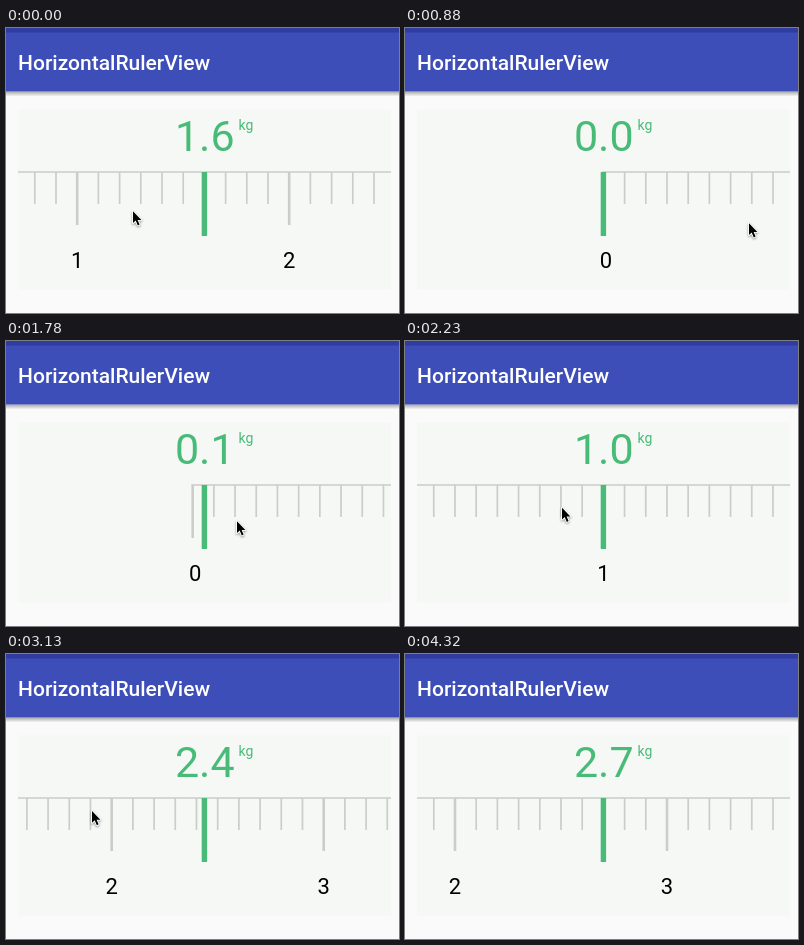
An HTML page for the animation above (4.47 s loop, 393x285 px).

```html
<!DOCTYPE html>
<html lang="en">
<head>
<meta charset="utf-8">
<title>HorizontalRulerView</title>
<style>
  html, body { margin: 0; width: 100%; height: 100%; overflow: hidden; background: #fafafa; }
  svg { display: block; width: 393px; height: 285px; font-family: Roboto, sans-serif; }
  #cursor { filter: drop-shadow(0 1px 1px rgba(0, 0, 0, .4)); }
</style>
</head>
<body>
<svg viewBox="0 0 393 285">
  <defs>
    <linearGradient id="shade" x2="0" y2="1">
      <stop offset="0" stop-color="#000" stop-opacity=".32"/>
      <stop offset="1" stop-color="#000" stop-opacity="0"/>
    </linearGradient>
    <clipPath id="panel"><rect x="12" y="82" width="373" height="180"/></clipPath>
  </defs>
  <rect width="393" height="285" fill="#fafafa"/>
  <rect y="63.5" width="393" height="5" fill="url(#shade)"/>
  <rect width="393" height="63.5" fill="#3d4eb8"/>
  <rect width="393" height="4.5" fill="#303c9f"/>
  <text x="12" y="42.4" font-size="21" font-weight="500" fill="#fff">HorizontalRulerView</text>
  <rect x="12" y="81.5" width="373" height="180" fill="#f6f8f5"/>
  <g clip-path="url(#panel)">
    <g fill="none" stroke="#cacdc9">
      <path id="base" stroke-width="1.7"/>
      <path id="minor" stroke-width="1.7"/>
      <path id="major" stroke-width="2.6"/>
    </g>
    <g id="labels" font-size="22" text-anchor="middle" fill="#000"></g>
  </g>
  <path d="M198.4 144V208" stroke="#48bb78" stroke-width="5.4"/>
  <g fill="#48bb78">
    <text id="value" x="198.8" y="123.2" font-size="43" text-anchor="middle"></text>
    <text x="232.6" y="101.8" font-size="14">kg</text>
  </g>
  <path id="cursor" d="M.5 .8V12.6L3.2 10.1L5.3 14.9L7.1 14.1L5.1 9.4H8.9Z"
        fill="#000" stroke="#fff" stroke-width="1.8" stroke-linejoin="round" paint-order="stroke"/>
</svg>
<script>
const LOOP = 4470, STEP = 149, STEPS = 30;
const CENTER = 198.4, UNIT = 212, TOP = 144;

const smooth = p => p * p * (3 - 2 * p);
const fling = p => 1 - (1 - p) ** 2.7;

// Each move eases to a new place between two steps.
const move = (from, to, place, ease = smooth) => ({ from, to, place, ease });

const scroll = {
  home: [1.6],
  moves: [move(0, 5, [0], fling), move(11.5, 15, [1]), move(14.95, 23, [2.7])]
};
const pointer = {
  home: [126.5, 182.5],
  moves: [
    move(0, 2, [348.5, 183.5]),
    move(2, 6, [343.5, 194.5]),
    move(8, 12, [230.5, 179.5]),
    move(12, 18, [82.5, 152.5]),
    move(18, 24, [88.5, 160]),
    move(24, 29, [350, 300])
  ]
};

function placeAt({ home, moves }, step) {
  return moves.reduce((at, { from, to, place, ease }) => {
    const p = ease(Math.min(1, Math.max(0, (step - from) / (to - from))));
    return at.map((v, i) => v + (place[i] - v) * p);
  }, home);
}

const $ = id => document.getElementById(id);
const labels = Array.from({ length: 5 }, (_, n) => {
  const el = document.createElementNS("http://www.w3.org/2000/svg", "text");
  el.textContent = n;
  el.setAttribute("y", 240);
  return $("labels").appendChild(el);
});

function draw(ms) {
  const step = Math.min(STEPS - 1, Math.floor((ms % LOOP + 14) / STEP));
  const [kg] = placeAt(scroll, step);
  const [x, y] = placeAt(pointer, step);
  const xOf = v => CENTER + (v - kg) * UNIT;

  let minor = "", major = "";
  for (let i = 0; i <= 40; i++) {
    const at = `M${xOf(i / 10).toFixed(2)} ${TOP}V`;
    if (i % 10) minor += at + 176;
    else major += at + 197;
  }
  $("minor").setAttribute("d", minor);
  $("major").setAttribute("d", major);
  $("base").setAttribute("d", `M${Math.max(12, xOf(0) - 1.3)} ${TOP}H385`);
  labels.forEach((el, n) => el.setAttribute("x", xOf(n) + (n ? 0 : 2.5)));
  $("value").textContent = kg.toFixed(1);
  $("cursor").setAttribute("transform", `translate(${x} ${y})`);
}

const start = performance.now();
function tick() {
  draw(performance.now() - start);
  requestAnimationFrame(tick);
}
tick();
</script>
</body>
</html>
```
